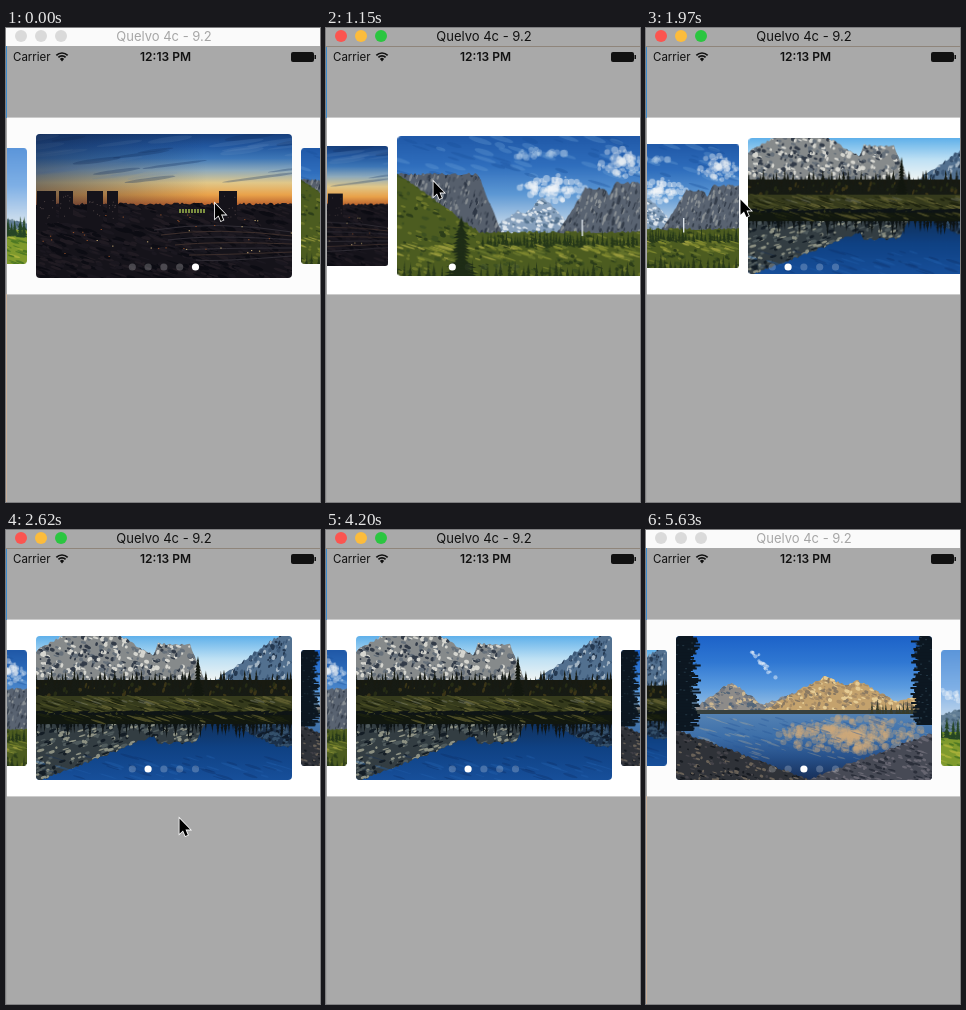
Recreate the animation shown at these times as an HTML page with a canvas. Size 314x474 px, loop 5.7 s.

```html
<!DOCTYPE html>
<html lang="en">
<head>
<meta charset="utf-8">
<title>Card carousel</title>
<style>
html, body { margin: 0; width: 100%; height: 100%; overflow: hidden; background: #a9a9a9; }
canvas { display: block; }
</style>
</head>
<body>
<canvas id="stage" width="314" height="474"></canvas>
<script>
const ctx = document.getElementById('stage').getContext('2d');
const LOOP = 5700, STEP = 58, W = 256, H = 144, MID = 158, GAP = 239.4;
const FONT = 'Inter, "Liberation Sans", sans-serif';
const INK = '#111';

const easeOut = power => u => 1 - (1 - u) ** power;
const smooth = u => u * u * (3 - 2 * u);

// Each slide turns one page; each leg takes the pointer on to (x, y)
const SLIDES = [
  { from: 910, to: 1390, ease: easeOut(2.5) },
  { from: 1740, to: 2210, ease: easeOut(2.5) },
  { from: 4730, to: 5020, ease: smooth }
];
const HOME = { x: 208.5, y: 175 };
const LEGS = [
  { from: 170, to: 580, x: 239, y: 154 },
  { from: 850, to: 1090, x: 107, y: 153 },
  { from: 1210, to: 1390, x: 158, y: 159 },
  { from: 1450, to: 1500, x: 210, y: 156 },
  { from: 1680, to: 1910, x: 94, y: 171 },
  { from: 2270, to: 2620, x: 173, y: 288 },
  { from: 3220, to: 3730, x: 249, y: 437 },
  { from: 3970, to: 4200, x: 256, y: 476 }
];

function progress(t, { from, to }) {
  if (t < from) return 0;
  if (t >= to) return 1;
  const n = Math.round((to - from) / STEP);
  return (Math.floor((t - from) / (to - from) * n) + .4) / (n + .4);
}

let seed = 1;
const rand = () => (seed = seed * 16807 % 2147483647) / 2147483647;
const spread = (a, b) => a + rand() * (b - a);

function rect(g, x, y, w, h, fill) {
  g.fillStyle = fill;
  g.fillRect(x, y, w, h);
}

function disc(g, x, y, r, fill) {
  g.fillStyle = fill;
  g.beginPath();
  g.arc(x, y, r, 0, 7);
  g.fill();
}

// Evenly spaced vertical gradient over the full width
function wash(g, y, h, ...colors) {
  const grad = g.createLinearGradient(0, y, 0, y + h);
  colors.forEach((color, i) => grad.addColorStop(i / (colors.length - 1), color));
  rect(g, 0, y, W, h, grad);
}

// Small flecks of random colour, shape w by h
function grain(g, top, bottom, count, w, h, colors) {
  for (let i = 0; i < count; i++) {
    g.fillStyle = colors[i % colors.length];
    g.beginPath();
    g.ellipse(spread(0, W), spread(top, bottom), w * spread(.3, 1), h * spread(.3, 1), .3, 0, 7);
    g.fill();
  }
}

// Skyline over a base; a peak is [centre, half width, height, steepness]
function ridge(g, base, peaks, fill, flecks, w = 1.5, h = 4) {
  const path = new Path2D();
  path.moveTo(-2, base);
  for (let x = -2; x <= W + 2; x += 2) {
    const up = Math.max(0, ...peaks.map(([c, half, high, steep = 1]) =>
      high * Math.min(1, steep * (1 - Math.abs(x - c) / half))));
    path.lineTo(x, base - up + (up && spread(-1.5, 1.5)));
  }
  path.lineTo(W + 2, base);
  g.fillStyle = fill;
  g.fill(path);
  g.save();
  g.clip(path);
  grain(g, base - Math.max(...peaks.map(p => p[2])), base, 700, w, h, flecks);
  g.restore();
}

function flipped(g, axis, paint) {
  g.save();
  g.translate(0, axis);
  g.scale(1, -1);
  paint();
  g.restore();
}

function puffs(g, x, y, rx, ry, n, color) {
  for (let i = 0; i < n; i++) {
    const a = spread(0, 6.3), r = rand();
    disc(g, x + rx * r * Math.cos(a), y + ry * r * Math.sin(a), spread(1, 4), color);
  }
}

function fir(g, x, base, h, w, fill) {
  g.fillStyle = fill;
  for (let k = 0; k < 1; k += 3 / h) {
    const half = w / 2 * (.15 + k) * spread(.5, 1.2), y = base - h * (1 - k);
    g.beginPath();
    g.moveTo(x, y - 2);
    g.lineTo(x + half, y + 4);
    g.lineTo(x - half, y + 3);
    g.fill();
  }
}

function forest(g, x0, x1, base, h, gap, fill) {
  for (let x = x0; x < x1; x += gap * spread(.6, 1.4)) {
    fir(g, x, base, h * spread(.5, 1), h * .4, fill);
  }
}

// Dark foliage hanging along one side
function foliage(g, x, bottom, width) {
  for (let y = 0; y < bottom; y += 1.5) {
    const w = width * spread(.65, 1.15);
    rect(g, x - w, y, 2 * w, 2, '#0c1721');
  }
  for (let i = 0; i < 70; i++) {
    rect(g, x + width * spread(-.9, .9), spread(0, bottom), 2, 1, '#233643');
  }
}

function valley(g) {
  wash(g, 0, 90, '#2059a8', '#2f6ebd', '#5d98d4', '#bcd3e8');
  grain(g, 0, 50, 60, 14, 3, ['rgba(24,78,152,.35)', 'rgba(110,162,214,.3)']);
  puffs(g, 160, 54, 34, 14, 90, 'rgba(240,244,248,.45)');
  puffs(g, 232, 26, 28, 16, 80, 'rgba(228,235,243,.4)');
  puffs(g, 145, 18, 28, 5, 30, 'rgba(180,205,232,.35)');
  ridge(g, 104, [[125, 40, 28], [150, 40, 42]], '#86a0bc', ['#dfe7ee', '#56738f'], 3, 2);
  ridge(g, 108, [[204, 44, 54, 1.3], [245, 45, 60, 1.8]], '#596371', ['#343d4a', '#8b9195', '#4a5360']);
  ridge(g, 106, [[30, 80, 67, 3]], '#565f6c', ['#2f3846', '#858b90', '#48515e']);
  ridge(g, 146, [[-20, 170, 122], [128, 400, 47, 3]], '#4c5c20', ['#2c3d19', '#6c772a', '#3d5020'], 4, 2);
  rect(g, 190, 86, 1.5, 17, '#dfe6ec');
  forest(g, 88, W, 112, 14, 4, '#263819');
  grain(g, 113, 128, 90, 9, 1.5, ['#7f882e', '#63722a', '#97993c']);
  forest(g, 0, W, 147, 18, 7, '#29391a');
  fir(g, 66, 144, 60, 32, '#1e2c16');
}

function mirror(g) {
  wash(g, 0, 46, '#5fb0ea', '#bfe1f4', '#f4f6f4');
  ridge(g, 46, [[55, 110, 48, 1.3], [138, 32, 38, 2]], '#868a8b', ['#323b48', '#d5d5cf', '#66707a'], 3, 2.5);
  ridge(g, 46, [[262, 85, 50, 1.2]], '#52708f', ['#243850', '#a3b4c3', '#3c5877'], 2, 3);
  rect(g, 0, 44, W, 20, '#181a11');
  forest(g, 0, W, 62, 28, 4, '#171b14');
  fir(g, 162, 60, 38, 13, '#12170f');
  grain(g, 48, 62, 60, 2, 3, ['#3b3517', '#262c15']);
  rect(g, 0, 60, W, 20, '#353a1c');
  grain(g, 61, 79, 180, 9, 1.2, ['#5d5c2f', '#1e230f', '#464a22']);
  grain(g, 64, 67, 14, 9, 1, ['rgba(150,152,138,.35)']);
  wash(g, 79, 65, '#102c50', '#0f4183', '#174f9a');
  flipped(g, 158, () => {
    ridge(g, 79, [[-10, 180, 68, 1.05], [140, 36, 28, 2]], '#333d42', ['#141d25', '#8d9183', '#4f5a5c'], 4, 2);
    ridge(g, 79, [[262, 85, 32, 1.3]], '#1b3049', ['#101c2b', '#34506b'], 3, 2);
    forest(g, 0, W, 80, 25, 5, '#0e1415');
    rect(g, 0, 70, W, 9, '#11170f');
  });
  grain(g, 79, 86, 50, 10, 1, ['#4a4a25', '#1a200f']);
  grain(g, 120, 144, 50, 12, 1.5, ['rgba(36,98,174,.35)', 'rgba(12,42,92,.3)']);
}

function lake(g) {
  wash(g, 0, 78, '#1c62c8', '#2f77d2', '#5c9cdf', '#a9c9e4');
  for (let i = 0; i < 30; i++) {
    const u = rand();
    disc(g, 78 + 20 * u + spread(-3, 3), 16 + 26 * u, spread(.6, 2.2), 'rgba(220,234,247,.55)');
  }
  ridge(g, 78, [[55, 45, 32], [118, 55, 21]], '#8d8b89', ['#536579', '#cdb892', '#77797f'], 3, 2);
  ridge(g, 78, [[150, 70, 38], [180, 65, 34], [245, 95, 18]], '#c4a26d', ['#8a7962', '#e6cc94', '#a98d66'], 3, 2);
  rect(g, 0, 74, W, 5, '#37403e');
  forest(g, 196, 242, 80, 16, 4, '#383c2b');
  wash(g, 78, 66, '#5482b4', '#3d6fa9', '#264f88', '#172e57');
  puffs(g, 175, 99, 75, 18, 420, 'rgba(204,168,122,.33)');
  grain(g, 82, 124, 150, 8, 1, ['rgba(215,190,148,.25)', 'rgba(40,88,152,.4)']);
  ridge(g, 146, [[-20, 160, 60]], '#2f3238', ['#6a6258', '#171b21', '#444349'], 3, 1.5);
  ridge(g, 146, [[275, 150, 56]], '#474a55', ['#2b2f3a', '#676671'], 4, 1.5);
  foliage(g, 0, 94, 22);
  foliage(g, W, 88, 19);
}

function meadow(g) {
  wash(g, 0, 94, '#5c96da', '#7fb0e6', '#d4e2ee');
  puffs(g, 40, 56, 60, 9, 60, 'rgba(240,245,250,.4)');
  ridge(g, 106, [[40, 120, 38], [160, 130, 42]], '#617d95', ['#48637a', '#7a92a3'], 3, 2);
  rect(g, 0, 102, W, 42, '#7f9a2d');
  grain(g, 102, H, 200, 9, 1.5, ['#a9b13a', '#4d7823']);
  forest(g, 0, W, 108, 25, 6, '#264525');
}

function city(g) {
  wash(g, 0, 73, '#173f7c', '#22579f', '#3d76b6', '#8eaabb', '#e0c789', '#e9a24a', '#ae5428');
  for (let i = 0; i < 34; i++) {
    const x = spread(-40, W), y = spread(2, 46), w = spread(30, 90);
    g.fillStyle = i % 3 ? 'rgba(120,156,200,.16)' : 'rgba(18,48,98,.3)';
    g.beginPath();
    g.ellipse(x + w / 2, y, w / 2, spread(1, 3), -.13, 0, 7);
    g.fill();
  }
  const dusk = g.createLinearGradient(0, 40, 170, 30);
  dusk.addColorStop(0, 'rgba(18,30,58,.5)');
  dusk.addColorStop(1, 'rgba(18,30,58,0)');
  rect(g, 0, 0, W, 73, dusk);
  ridge(g, 146, [[128, 400, 76, 3]], '#15131a', ['#201b22', '#0c0c13', '#1a171f'], 8, 2);
  for (const [x, w] of [[1, 19], [23, 14], [51, 16], [71, 11], [183, 18]]) {
    rect(g, x, 57, w, 32, '#15131a');
    for (let i = 0; i < 9; i++) rect(g, x + spread(1, w - 2), spread(61, 84), 1, 1, '#4b4042');
  }
  for (let x = 143; x < 169; x += 3) rect(g, x, 75, 2, 4, '#7c8f40');
  for (let i = 0; i < 7; i++) {
    g.strokeStyle = i % 2 ? '#3d2f2c' : '#302d35';
    g.beginPath();
    g.moveTo(118 + i * 7, 96 + i * 5);
    g.quadraticCurveTo(180, 86 + i * 7, W, 98 + i * 4);
    g.stroke();
  }
  for (let i = 0; i < 40; i++) rect(g, spread(0, W), spread(80, 122), 1.3, 1, i % 3 ? '#8f4f2a' : '#c2a873');
}

const cards = [valley, mirror, lake, meadow, city].map((paint, i) => {
  const card = document.createElement('canvas');
  card.width = W;
  card.height = H;
  const g = card.getContext('2d');
  seed = 911 + i * 77;
  g.beginPath();
  g.roundRect(0, 0, W, H, 4);
  g.clip();
  paint(g);
  return card;
});

function label(str, x, y, font, fill, align) {
  ctx.font = font + ' ' + FONT;
  ctx.fillStyle = fill;
  ctx.textAlign = align;
  ctx.fillText(str, x, y);
}

function titleBar(active) {
  if (active) rect(ctx, 0, 18, 314, 1, '#8f857b');
  else rect(ctx, 0, 0, 314, 18, '#fafafa');
  const lights = active ? ['#fb5550', '#fcbc3c', '#2bc640'] : Array(3).fill('#dadada');
  lights.forEach((color, i) => disc(ctx, 15 + i * 20, 8, 6, color));
  label('Quelvo 4c - 9.2', MID, 13, '13px', active ? INK : '#a6a6a6', 'center');
}

function statusBar() {
  label('Carrier', 7, 33, '11.5px', INK, 'left');
  label('12:13 PM', 159.5, 33, '600 12px', INK, 'center');
  ctx.strokeStyle = ctx.fillStyle = INK;
  const fan = r => {
    ctx.beginPath();
    ctx.arc(56, 33, r, -Math.PI * .75, -Math.PI * .25);
  };
  ctx.lineWidth = 1.7;
  for (const r of [8, 5.1]) {
    fan(r);
    ctx.stroke();
  }
  fan(3);
  ctx.lineTo(56, 33.5);
  ctx.fill();
  ctx.beginPath();
  ctx.roundRect(285, 24, 23, 10, 2);
  ctx.fill();
  rect(ctx, 308.5, 27, 1.5, 4, INK);
}

function carousel(pos, active) {
  rect(ctx, 1, 89.6, 313, 176.8, active ? '#fff' : '#fcfcfc');
  ctx.save();
  ctx.beginPath();
  ctx.rect(1, 90, 313, 176);
  ctx.clip();
  for (let k = Math.floor(pos) - 1; k < pos + 2; k++) {
    const d = k - pos, s = 1 - .2 * Math.abs(d);
    ctx.drawImage(cards[k % 5], MID + d * GAP - W * s / 2, 178 - H * s / 2, W * s, H * s);
  }
  ctx.restore();
  const page = Math.round(pos) % 5, faint = page ? .22 : .03;
  for (let i = 0; i < 5; i++) {
    disc(ctx, 126.3 + i * 15.8, 239, 3.6, `rgba(255,255,255,${i === page ? 1 : faint})`);
  }
}

function arrow({ x, y }) {
  const path = new Path2D('M0 0V15.2L3.5 12L5.9 17.4L8.3 16.4L6 11.1H10.7Z');
  ctx.save();
  ctx.translate(x + .5, y + .5);
  ctx.strokeStyle = '#fff';
  ctx.lineWidth = 1.6;
  ctx.stroke(path);
  ctx.fillStyle = '#000';
  ctx.fill(path);
  ctx.restore();
}

function pointer(t) {
  const ease = easeOut(1.7);
  return LEGS.reduce((at, leg) => {
    const u = ease(progress(t, leg));
    return { x: at.x + (leg.x - at.x) * u, y: at.y + (leg.y - at.y) * u };
  }, HOME);
}

function draw(t) {
  const active = t >= 850 && t < 5630;
  rect(ctx, 0, 0, 314, 474, '#a9a9a9');
  rect(ctx, 0, 18, 1, 72, '#3e8bcb');
  rect(ctx, 0, 266, 1, 208, active ? '#a0a0a0' : '#c7ae98');
  titleBar(active);
  statusBar();
  carousel(SLIDES.reduce((pos, s) => pos + s.ease(progress(t, s)), 4), active);
  arrow(pointer(t));
}

const start = performance.now();
function tick() {
  draw((performance.now() - start) % LOOP);
  requestAnimationFrame(tick);
}
tick();
</script>
</body>
</html>
```
